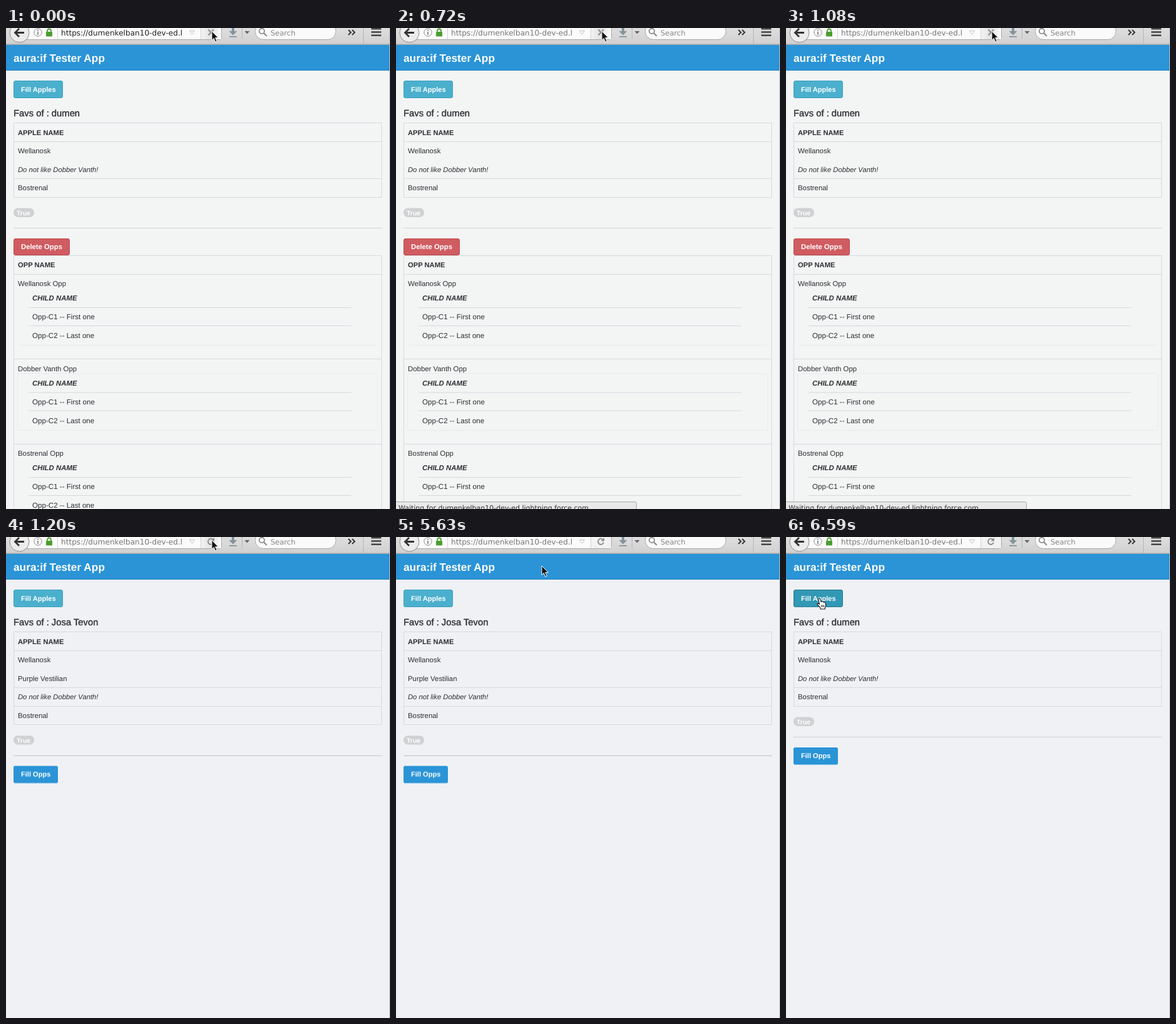
Recreate the animation shown at these times as an HTML page. Size 614 px wide and 768 px high, loop 8 s.

```html
<!DOCTYPE html>
<html lang="en">
<head>
<meta charset="utf-8">
<title>aura:if Tester App</title>
<style>
html, body { margin: 0; width: 100%; height: 100%; overflow: hidden; background: #eff1f4; }
svg { display: block; width: 614px; height: 768px; font: 11.4px "Liberation Sans", sans-serif; fill: #2c2f33; text-rendering: geometricPrecision; }
.ui { font-family: "DejaVu Sans", sans-serif; }
.b { font-weight: bold; font-size: 11.2px; }
.i { font-style: italic; font-size: 11.25px; }
.h { font-size: 14.8px; stroke: #2c2f33; stroke-width: .35; }
.btn { font-weight: bold; font-size: 11.1px; fill: #fff; }
.line { fill: none; stroke: #d5d9dd; }
.faint { fill: none; stroke: #e7eaec; }
.ico { fill: none; stroke: #8a8a8a; }

/* one 8 s timeline, hard cuts only */
.t { animation: 8s step-end infinite; }
.bg { animation-name: bg; }
.first { animation-name: first; }
.later { animation-name: later; }
.short { animation-name: short; }
.long { animation-name: long; }
.tail { animation-name: tail; }
.panel { animation-name: panel; }
.data { animation-name: data; }
.wait { animation-name: wait; }
.url { animation-name: url; }
.over { animation-name: over; }
.hot { animation-name: hot; }
.arrow { animation-name: arrow; }
.hand { animation-name: hand; }
@keyframes bg { 0% { fill: #f3f5f5; } 4.5% { fill: #f3f4f4; } 15%, 100% { fill: #eff1f4; } }
@keyframes first { 0% { opacity: 1; } 15%, 100% { opacity: 0; } }
@keyframes later { 0% { opacity: 0; } 15%, 100% { opacity: 1; } }
@keyframes short { 0% { opacity: 1; } 15% { opacity: 0; } 82.375%, 100% { opacity: 1; } }
@keyframes long { 0% { opacity: 0; } 15% { opacity: 1; } 82.375%, 100% { opacity: 0; } }
@keyframes tail { 0% { transform: none; } 15% { transform: translateY(29.5px); } 82.375%, 100% { transform: none; } }
@keyframes panel { 0% { opacity: 0; } 4.5% { opacity: 1; } 15%, 100% { opacity: 0; } }
@keyframes data { 0% { opacity: 0; } 6% { opacity: 1; } 9%, 100% { opacity: 0; } }
@keyframes wait { 0% { opacity: 1; } 6% { opacity: 0; } 9%, 100% { opacity: 1; } }
@keyframes url { 0% { fill: #222; } 4.5%, 100% { fill: #777; } }
@keyframes over { 0% { opacity: 1; } 67.5%, 100% { opacity: 0; } }
@keyframes hot { 0% { fill: #4bb0cd; stroke: #3a9fbe; } 73.375%, 100% { fill: #3198b5; stroke: #25788f; } }
@keyframes arrow {
  0% { transform: translate(329px, 5px); opacity: 1; }
  66% { transform: translate(327px, 5px); }
  67.5% { transform: translate(303px, 17px); }
  69% { transform: translate(233px, 46px); }
  70.5% { transform: translate(150px, 75px); }
  72% { transform: translate(95px, 92px); opacity: 1; }
  73.375%, 100% { transform: translate(60px, 98px); opacity: 0; }
}
@keyframes hand {
  0% { transform: translate(60px, 98px); opacity: 0; }
  73.375% { transform: translate(60px, 98px); opacity: 1; }
  74.875%, 100% { transform: translate(54px, 98px); opacity: 1; }
}
</style>
</head>
<body>
<svg viewBox="0 0 614 768">
  <defs>
    <linearGradient id="bar" x2="0" y2="1"><stop stop-color="#dedede"/><stop offset="1" stop-color="#d0d0d0"/></linearGradient>
    <linearGradient id="reload"><stop stop-color="#f2f2f2"/><stop offset=".5" stop-color="#e2e2e2"/><stop offset="1" stop-color="#fcfcfc"/></linearGradient>
    <clipPath id="urlClip"><path d="M84 0H286V18H84z"/></clipPath>
    <g id="kids">
      <text class="b i" x="42" y="435" style="font-size:11.4px">CHILD NAME</text>
      <path class="line" d="M36 446.5H552M36 475.5H552"/>
      <text x="42" y="465" font-size="11.6">Opp-C1 -- First one</text>
      <text x="42" y="495" font-size="11.6">Opp-C2 -- Last one</text>
    </g>
  </defs>

  <rect class="t bg" width="614" height="768"/>

  <!-- page header -->
  <path fill="#2a94d7" d="M0 27H613V68H0z"/>
  <path fill="#2280bd" d="M0 67H613V68H0z"/>
  <text x="12" y="54" font-size="17.3" font-weight="bold" fill="#fff">aura:if Tester App</text>

  <rect class="t hot" x="12.5" y="84.5" width="78" height="27" rx="2.5"/>
  <text class="btn" x="24" y="102">Fill Apples</text>

  <!-- apples -->
  <text class="b" x="19" y="171">APPLE NAME</text>
  <text x="19" y="200">Wellanosk</text>
  <g class="t short">
    <text class="h" x="12" y="141">Favs of : dumen</text>
    <path class="line" d="M12.5 151.5H600.5V270.5H12.5zM12 181.5H601M12 240.5H601"/>
    <text class="i" x="19" y="230">Do not like Dobber Vanth!</text>
    <text x="19" y="259">Bostrenal</text>
  </g>
  <g class="t long">
    <text class="h" x="12" y="141">Favs of : Josa Tevon</text>
    <path class="line" d="M12.5 151.5H600.5V299.5H12.5zM12 181.5H601M12 240.5H601M12 270.5H601"/>
    <text x="19" y="230">Purple Vestilian</text>
    <text class="i" x="19" y="259">Do not like Dobber Vanth!</text>
    <text x="19" y="289">Bostrenal</text>
  </g>

  <g class="t tail">
    <rect x="12" y="287.5" width="33" height="14.5" rx="7.2" fill="#cfd1d3"/>
    <text class="btn" x="17" y="299" style="font-size:10.5px">True</text>
    <path class="line" style="stroke:#cdd0d2" d="M12 319.5H601"/>
    <g class="t later">
      <rect x="12" y="336" width="71" height="27.5" rx="2.5" fill="#2a94d7"/>
      <text class="btn" x="24" y="353">Fill Opps</text>
    </g>
  </g>

  <!-- opps -->
  <g class="t first">
    <rect x="12.5" y="336.5" width="89" height="26" rx="2.5" fill="#d05c61" stroke="#c2454b"/>
    <text class="btn" x="24" y="353" style="font-size:11.3px">Delete Opps</text>
    <path class="line" d="M12.5 768V363.5H600.5V768M12 393.5H601M12 528.5H601M12 664.5H601"/>
    <path class="faint" d="M22 506.5H592"/>
    <rect class="faint" x="18.5" y="551.5" width="576" height="91" rx="3"/>
    <text class="b" x="19" y="382">OPP NAME</text>
    <text x="19" y="412">Wellanosk Opp</text>
    <text x="19" y="548">Dobber Vanth Opp</text>
    <text x="19" y="683">Bostrenal Opp</text>
    <use href="#kids"/>
    <use href="#kids" y="135.5"/>
    <use href="#kids" y="271"/>
  </g>

  <!-- status panel -->
  <g class="t panel">
    <path fill="#e8e8e8" stroke="#a6a6a6" d="M-1 756.5H381.5Q384.5 756.5 384.5 759.5V770H-1z"/>
    <g class="ui" font-size="11" fill="#333">
      <text class="t data" x="4" y="770">Transferring data from dumenkelban10-dev-ed.lightning.force.com…</text>
      <text class="t wait" x="4" y="770">Waiting for dumenkelban10-dev-ed.lightning.force.com…</text>
    </g>
  </g>

  <!-- browser toolbar -->
  <path fill="url(#bar)" d="M0 0H613V26H0z"/>
  <path fill="#a9a9a9" d="M0 25.5H613V27H0z"/>
  <path fill="#fbfbfb" stroke="#a8a8a8" d="M30 -2H344.5V15.5Q344.5 18.5 341.5 18.5H30z"/>
  <path fill="#f2f2f2" d="M312 0H344V18H312z"/>
  <path class="t over" fill="url(#reload)" d="M312 0H344V18H312z"/>
  <circle cx="21.5" cy="7.5" r="15.5" fill="#ececec" stroke="#888"/>
  <path fill="none" stroke="#333" stroke-width="2.8" d="M29 7.5H15M21 1L14.5 7.5L21 14"/>
  <circle class="ico" cx="51" cy="7" r="6.2"/>
  <path fill="#777" d="M50.2 3H51.8V4.8H50.2zM50.2 6H51.8V11H50.2z"/>
  <path fill="none" stroke="#4a9e2e" stroke-width="1.8" d="M66 7V4.5A3 3 0 0 1 72 4.5V7"/>
  <rect x="64" y="6" width="10" height="7.5" rx="1" fill="#4a9e2e"/>
  <path stroke="#d5d5d5" d="M82.5 0V18M311.5 0V18"/>
  <g clip-path="url(#urlClip)"><text class="ui t url" x="88" y="12" font-size="12.1">https://dumenkelban10-dev-ed.l</text></g>
  <path class="ico" style="stroke:#c4c4c4" d="M293.5 4.5H301.5L297.5 10.5z"/>
  <path class="ico t first" stroke-width="2" d="M323.5 2.5L332 11.5M332 2.5L323.5 11.5"/>
  <g class="t later">
    <path class="ico" stroke-width="1.8" d="M331 4.2A4.6 4.6 0 1 0 332 8.5"/>
    <path fill="#8a8a8a" d="M333 1V6.5H327.5z"/>
  </g>
  <path fill="#84949a" d="M361 0H365V5H369.5L363 11.5L356.5 5H361zM357 13H369V14.8H357z"/>
  <path stroke="#b5b5b5" d="M377.5 0V17M571.5 0V26"/>
  <path fill="#666" d="M381.5 5H389.5L385.5 9.5z"/>
  <rect x="398.5" y="-8" width="129" height="26.5" rx="13" fill="#fafafa" stroke="#a8a8a8"/>
  <circle class="ico" cx="409" cy="5" r="4.2" stroke-width="1.8"/>
  <path class="ico" stroke-width="2.2" d="M412 8L417 13"/>
  <text class="ui" x="423" y="12" font-size="11.6" fill="#858585">Search</text>
  <path fill="none" stroke="#333" stroke-width="2" d="M547.5 3L551.5 7L547.5 11M553.5 3L557.5 7L553.5 11"/>
  <path stroke="#444" stroke-width="2.4" d="M584 1.2H600M584 6.5H600M584 11.8H600"/>
  <path stroke="#b9bcbe" d="M613.5 0V768"/>

  <!-- pointers -->
  <path class="t arrow" fill="#111" stroke="#fff" stroke-width="1" d="M0 0V14.5L3.3 11.5L5.8 17.3L8.3 16.2L5.8 10.6H10.4z"/>
  <g class="t hand">
    <path fill="#fff" stroke="#111" stroke-width="1.1" stroke-linejoin="round" d="M-2.2 1.2Q-2.2 -.2 -1 -.2Q.2 -.2 .7 1.2L2 5.4Q3.6 4.4 4.6 5.6Q6.2 4.9 7 6.3Q8.8 6 9.2 7.6L9.6 11Q9.6 13 8.4 14.5V17H1V15Q-1.2 12.5 -3.8 9.8Q-4.4 8 -2.6 8L-.6 9.3z"/>
    <path stroke="#111" stroke-width=".9" d="M2.6 10.5V14M4.6 10.5V14M6.6 10.5V14"/>
  </g>
</svg>
</body>
</html>
```
